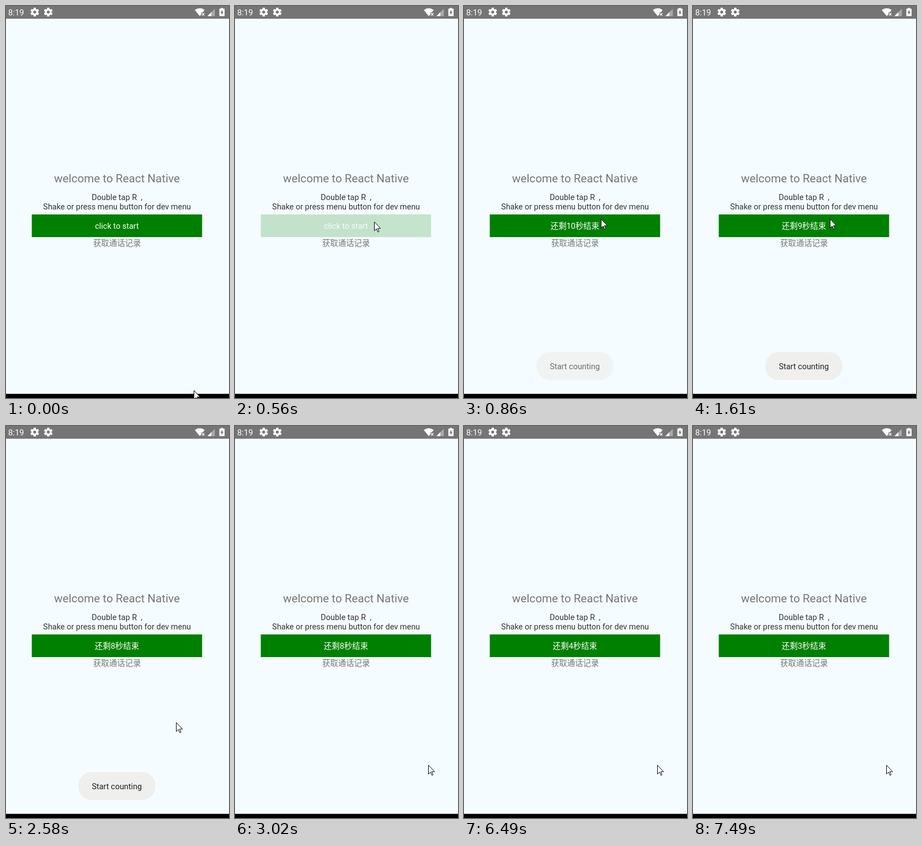
Write an HTML page that moves like this. It is 404x709 px and loops after 8 s.

```html
<!DOCTYPE html>
<html lang="zh-CN">
<head>
<meta charset="utf-8">
<title>Countdown button</title>
<style>
  html, body { margin: 0; width: 100%; height: 100%; overflow: hidden; background: #f5fcff; }
  svg { display: block; width: 404px; height: 709px; }
  text {
    font: 14.45px Roboto, "Noto Sans CJK SC", "Noto Sans CJK", sans-serif;
    text-anchor: middle;
    white-space: pre;
  }
  .title { font-size: 20.65px; }
  .clock { font-size: 14.9px; text-anchor: start; }
</style>
</head>
<body>
<svg viewBox="0 0 404 709">
  <defs>
    <rect id="tooth" x="-2.1" y="-7.9" width="4.2" height="5" rx=".6"/>
    <g id="gear">
      <circle r="4.3" fill="none" stroke="#fff" stroke-width="3.2"/>
      <use href="#tooth"/>
      <use href="#tooth" transform="rotate(60)"/>
      <use href="#tooth" transform="rotate(120)"/>
      <use href="#tooth" transform="rotate(180)"/>
      <use href="#tooth" transform="rotate(240)"/>
      <use href="#tooth" transform="rotate(300)"/>
    </g>
  </defs>

  <rect width="404" height="709" fill="#f5fcff"/>

  <!-- status bar -->
  <rect width="404" height="23" fill="#757575"/>
  <g fill="#fff">
    <text class="clock" x="4" y="17">8:19</text>
    <use href="#gear" x="52" y="11"/>
    <use href="#gear" x="76.6" y="11"/>
    <path d="M342 7.2Q351 .8 360 7.2L356.5 11.5H354V15L351 18.3Z"/>
    <path d="M355 12.8L359.4 17.4M359.4 12.8L355 17.4" stroke="#fff" stroke-width="1.3"/>
    <path d="M365 18.3L378.3 5V18.3Z" fill="#aaa"/>
    <path d="M365 18.3L372 11.3V18.3Z"/>
    <path d="M389.3 4.8V3.4H393V4.8H395.2Q396 4.8 396 5.6V17.5Q396 18.3 395.2 18.3H387.3Q386.5 18.3 386.5 17.5V5.6Q386.5 4.8 387.3 4.8Z"/>
    <path d="M391.9 6.8V10.6H394L390.6 16.4V12.4H388.5Z" fill="#757575"/>
  </g>

  <!-- page -->
  <text class="title" x="201" y="318.7" fill="#757575">welcome to React Native</text>
  <g fill="#333">
    <text x="201.2" y="350.8">Double tap R&#160;&#160;,</text>
    <text x="201.2" y="367.7">Shake or press menu button for dev menu</text>
  </g>
  <g id="button">
    <rect x="46.7" y="377" width="308.6" height="41" fill="#008000"/>
    <text id="label" x="201" y="403" fill="#fff">click to start</text>
  </g>
  <text x="201.2" y="434" fill="#757575">获取通话记录</text>

  <g id="toast" opacity="0">
    <rect x="131" y="626" width="139.7" height="50.5" rx="24.5" fill="#efefee"/>
    <text x="200.8" y="657" fill="#222">Start counting</text>
  </g>

  <rect y="701.5" width="404" height="7.5"/>

  <path id="cursor" d="M.5 .5V16.5L4.2 13L6.8 18.8L8.9 17.9L6.4 12.2H11.6Z" fill="#fff" stroke="#000"/>
</svg>
<script>
  const LOOP = 8000;
  const [button, label, toast, cursor] =
    ["button", "label", "toast", "cursor"].map(id => document.getElementById(id));

  // Bursts of screen updates: first, last, count. Motion holds between updates.
  const bursts = [[60, 330, 5], [560, 1080, 8], [1750, 1910, 3], [2050, 2190, 3], [2580, 3020, 7]];

  // Cursor moves: begin, end, x, y.
  const start = [340, 695];
  const moves = [
    [0, 330, 252, 390], [640, 700, 248, 385], [1690, 1910, 295, 532],
    [1980, 2190, 308, 536], [2590, 2870, 359, 598], [2870, 3020, 350, 613]
  ];

  const ticks = [1610, 2580, 3560, 4480, 5490, 6490, 7490];

  const clamp = v => Math.min(1, Math.max(0, v));
  const span = (t, from, length) => clamp((t - from) / length);
  const smooth = p => p * p * (3 - 2 * p);
  const inOut = p => p < .5 ? 2 * p * p : 1 - 2 * (1 - p) ** 2;

  function snap(t) {
    let held = 0;
    for (const [first, last, count] of bursts) {
      if (t < first) break;
      const step = (last - first) / (count - 1);
      held = first + step * Math.min(count - 1, Math.floor((t - first + 5) / step));
    }
    return held;
  }

  function cursorAt(t) {
    let [x, y] = start;
    for (const [from, to, nx, ny] of moves) {
      const p = smooth(span(t, from, to - from));
      x += (nx - x) * p;
      y += (ny - y) * p;
    }
    return [Math.round(x), Math.round(y)];
  }

  function draw(time) {
    const t = time % LOOP;
    const s = snap(t);

    const left = 10 - ticks.filter(at => t >= at).length;
    const text = s < 630 ? "click to start" : `还剩${left}秒结束`;
    if (label.textContent !== text) label.textContent = text;

    button.setAttribute("opacity", s < 560 ? 1 : .2 + .8 * inOut(span(s, 600, 250)));

    const shown = 1 - (1 - span(s, 700, 380)) ** 2;
    const gone = span(s, 2650, 365) ** 2;
    toast.setAttribute("opacity", shown * (1 - gone));

    cursor.setAttribute("transform", `translate(${cursorAt(s)})`);
  }

  let origin;
  function frame(now) {
    origin ??= now;
    draw(now - origin);
    requestAnimationFrame(frame);
  }
  draw(0);
  requestAnimationFrame(frame);
</script>
</body>
</html>
```
